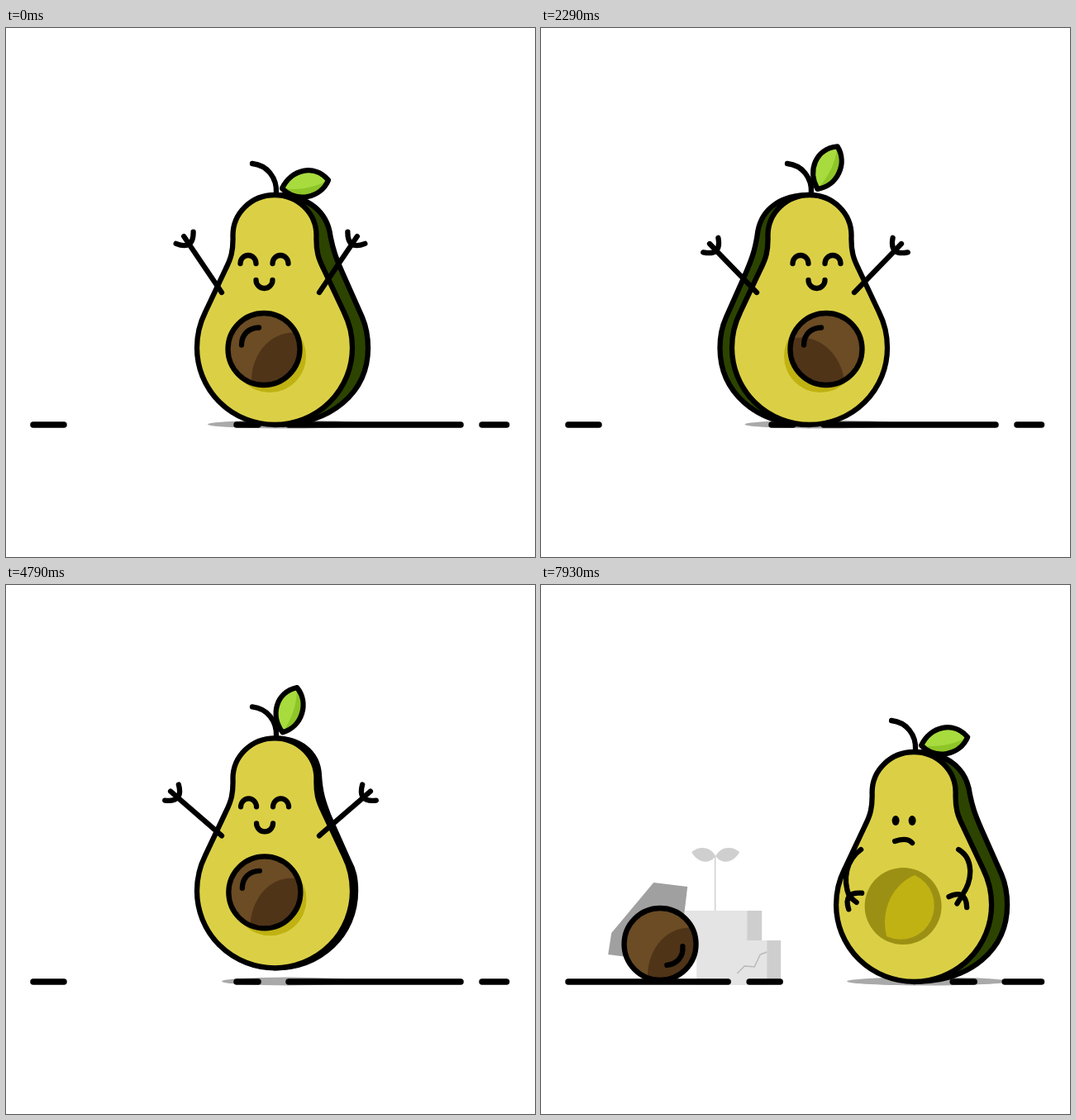
These frames come from a looping animation (640 by 640 pixels, 8 s). An HTML page:

```html
<!DOCTYPE html>
<html lang="en">
<head>
<meta charset="utf-8">
<title>Avocado</title>
<style>
html, body { margin: 0; width: 100%; height: 100%; overflow: hidden; background: #fff; }
svg { display: block; width: 100vw; height: 100vh; }
.ink { stroke: #000; stroke-width: 6.3; stroke-linecap: round; stroke-linejoin: round; }
.line { fill: none; }
</style>
</head>
<body>
<svg id="stage" viewBox="0 0 640 640">
  <g id="ruins">
    <path fill="#a0a0a0" d="M136 360L177 365L166 458L81 447L85 421Z"/>
    <path fill="#e4e4e4" d="M174 394H249V430H174ZM188 430H273V484H188Z"/>
    <path fill="#cecece" d="M249 394H267V430H249ZM273 430H290V477H273Z"/>
    <path fill="none" stroke="#b8b8b8" stroke-width="1.4" d="M237 470L246 461L258 462L265 447L273 444"/>
    <path fill="none" stroke="#cfcfcf" stroke-width="1.4" d="M210.500 394V328"/>
    <path fill="#cfcfcf" d="M211 328C204 315 190 316 182 323C189 336 203 339 211 328C219 339 233 336 240 323C232 316 218 315 211 328Z"/>
  </g>
  <ellipse id="shadow" cy="479.500" ry="5" fill="#a9a9a9"/>
  <path id="ground" class="ink line" style="stroke-width:7.5"/>
  <g id="body">
    <path id="stem" class="ink line" d="M298 164C316 166 328 181 327 200"/>
    <path id="back" class="ink" fill="#2c4400"/>
    <g id="leaf">
      <path fill="#a8dc3e" d="M334 194C345 171 373 164 390 184C381 206 351 212 334 194Z"/>
      <path fill="#8ec528" d="M334 194C354 197 374 193 390 184C381 206 351 212 334 194Z"/>
      <path class="ink line" d="M334 194C345 171 373 164 390 184C381 206 351 212 334 194Z"/>
    </g>
    <path class="ink" fill="#dbd045" d="M325 202C297 202 274 224 274.500 252C275 270 272 279 266 291L241 344C234 358 231 372 231 387A94 93 0 0 0 419 387C419 372 416 358 409 344L384 291C378 279 375 270 375.500 252C376 224 353 202 325 202Z"/>
    <g id="hole">
      <circle cx="312" cy="388.500" r="46.500" fill="#9c9014"/>
      <path fill="#c0b212" d="M326 351C300 362 284 392 292 425A40.500 40.500 0 1 0 326 351Z"/>
    </g>
    <circle id="cast" cy="397" r="44" fill="#c0b212"/>
    <g id="happy" class="ink line">
      <path d="M283.500 285a9.500 10 0 0 1 19 0M322.500 285a9.500 10 0 0 1 19 0M302.500 305a10 10 0 0 0 20 0"/>
    </g>
    <g id="sad">
      <ellipse cx="303" cy="285" rx="4.500" ry="6"/>
      <ellipse cx="323" cy="285" rx="4.500" ry="6"/>
      <path class="ink line" d="M302 310Q317 305 323 312"/>
    </g>
    <g id="slot"></g>
    <path id="armL" class="ink line"/>
    <path id="armR" class="ink line" transform="matrix(-1 0 0 1 640 0)"/>
  </g>
  <g id="seed">
    <circle r="43.500" fill="#6b4c24"/>
    <path id="shade" fill="#4f3418" d="M-15 41C-16 8 6 -21 38 -20A43.500 43.500 0 0 1 -15 41Z"/>
    <path id="shine" class="ink line" d="M-27 -5C-27 -18 -18 -26 -6 -26"/>
    <circle r="43.500" class="ink line"/>
  </g>
</svg>
<script>
const LOOP = 8000, CYCLE = 2590, POP = 5520;
const el = {};
document.querySelectorAll('[id]').forEach(e => el[e.id] = e);

const set = (e, attrs) => { for (const k in attrs) e.setAttribute(k, attrs[k]); };
const show = (e, on) => e.style.display = on ? '' : 'none';
const mix = (a, b, u) => a + (b - a) * u;
const smooth = (t, a, b) => {
  const u = Math.min(1, Math.max(0, (t - a) / (b - a)));
  return u * u * (3 - 2 * u);
};
// Eased keyframes given as time, value, time, value...
function keys(t, ...k) {
  let v = k[1];
  for (let i = 2; i < k.length; i += 2)
    if (t > k[i - 2]) v = mix(k[i - 1], k[i + 1], smooth(t, k[i - 2], k[i]));
  return v;
}

function backPath(turn) {
  const s = turn < 0 ? -1 : 1, m = Math.abs(turn);
  const x = (base, d) => (325 + s * (base + d * m)).toFixed(2);
  return `M325 202C${x(28, 8)} 202 ${x(50, 10)} 218 ${x(50.5, 16)} 246` +
    `C${x(51, 19)} 268 ${x(55, 20)} 280 ${x(61, 21)} 296L${x(85, 21)} 350` +
    `C${x(92, 19)} 362 ${x(94, 19)} 372 ${x(94, 19)} 387` +
    `C${x(94, 19)} 440 ${x(52, 18)} 480 325 480Z`;
}

// Poses hold two control points and the wrist, for an arm on the left.
const HANG = [[240, 320, 222, 335, 217, 360], [242, 319, 228, 334, 222, 361]];
const HOLD = [[244, 332, 238, 355, 247, 377], [244, 330, 242, 355, 257, 376]];
const HOLD_TURN = [231, 211];

function armPath(side, swing, drop, hold) {
  const h = mix(mix(34 + swing, 180, drop), HOLD_TURN[side], hold) * Math.PI / 180;
  const ux = -Math.sin(h), uy = -Math.cos(h);
  const bend = smooth(drop, 0.45, 1);
  const p = HANG[side].map((v, i) => {
    const reach = [24, 48, 71][i >> 1];
    const straight = i % 2 ? 320 + uy * reach : 261 + ux * reach;
    return mix(mix(straight, v, bend), HOLD[side][i], hold);
  });
  const at = (u, v) => `${(p[4] + ux * u - uy * v).toFixed(2)} ${(p[5] + uy * u + ux * v).toFixed(2)}`;
  return `M261 320C${p.map(v => v.toFixed(2)).join(' ')}L${at(11, 0)}` +
    `M${at(9, -12.8)}Q${at(-10, 0)} ${at(9, 12.5)}`;
}

function groundPath(pan) {
  return [[-400, 7], [33, 70], [279, 305], [342, 550], [576, 1200]].map(([a, b]) => {
    const l = Math.max(33, a + pan), r = Math.min(605.5, b + pan);
    return r > l ? `M${l.toFixed(2)} 480H${r.toFixed(2)}` : '';
  }).join('');
}

function seedY(t) {
  const hop = (a, b, h) => t > a && t < b ? 4 * h * (t - a) * (b - t) / (b - a) ** 2 : 0;
  const base = mix(395, 432.5, smooth(t, POP, 5830));
  return base - hop(POP, 5830, 45) - hop(5830, 6030, 21.5) - hop(6030, 6150, 5);
}

function draw(t) {
  const jumps = t < 2 * CYCLE;
  const first = t < CYCLE;
  const p = jumps ? t % CYCLE : 0;

  const pan = 225 * smooth(t, 7000, 8030);
  const shift = pan * 126 / 219;
  const lift = jumps ? Math.max(0, 46.2 * (1 - ((p - 1845) / 445) ** 2)) : 0;
  const squash = jumps
    ? keys(p, 0, 0, 600, .155, 860, .165, 1030, .21, 1390, 0, 2290, 0, 2420, .21, 2585, 0)
    : keys(t, 5200, 0, 5490, .168, 5740, 0);
  const swing = keys(p, 1380, 0, 1500, 9, 1900, 16, 2210, 15, 2420, 0);
  const leaf = keys(p, 1380, 0, 1500, 24, 1750, 20, 2110, -62, 2240, -62, 2480, 0);
  const shrink = keys(p, 1380, 0, 1500, 11, 1850, 30, 2200, 17, 2320, 0);

  // 0 has the skin on the right, 1 on the left
  const way = u => !jumps ? 0 : first ? u : 1 - u;
  const face = way(smooth(p, 1550, 2270));
  const skin = way(smooth(p, 1745, 2510));
  const seedX = mix(312, 345, face);
  const side = mix(1, -1, face);

  set(el.ruins, { transform: `translate(${(pan - 219) * 1.35} 0)` });
  set(el.ground, { d: groundPath(pan) });
  set(el.shadow, { cx: 341.5 + shift, rx: 97.5 - shrink });
  const pose = `translate(${325 + shift} ${480 - lift}) scale(${1 + squash} ${1 - squash * .44}) translate(-325 -480)`;
  set(el.body, { transform: pose });
  set(el.back, { d: backPath(mix(1, -1.2, skin)) });
  set(el.leaf, { transform: `rotate(${leaf} 335 194)` });

  const popped = t >= POP, gloomy = t >= 6400;
  show(el.hole, popped);
  show(el.cast, !popped);
  show(el.happy, !gloomy);
  show(el.sad, gloomy);
  set(el.cast, { cx: seedX + 7 * side });
  set(el.happy, { transform: `translate(${mix(0, 21, face)} 0)` });

  const drop = smooth(t, 6080, 6620), hold = smooth(t, 7150, 7700);
  set(el.armL, { d: armPath(0, swing, drop, hold) });
  set(el.armR, { d: armPath(1, swing, drop, hold) });

  const home = popped ? el.stage : el.slot;
  if (el.seed.parentNode !== home) home.appendChild(el.seed);
  let x = seedX, y = 388.5, spin = 0;
  if (popped) {
    const u = Math.min(1, (t - POP) / 410);
    x = mix(310, 142, 1 - (1 - u) ** 2) - 89 * smooth(t, 5900, 6920) + pan * 91 / 219;
    y = seedY(t) + pan / 219 * 2;
    spin = -132 * u - 213 * smooth(t, 5900, 6950) - pan / 219 * 200;
  }
  set(el.seed, { transform: `translate(${x} ${y})` });
  set(el.shade, { transform: `scale(${side} 1) rotate(${13 * skin})` });
  set(el.shine, { transform: `rotate(${spin})` });
}

const start = performance.now();
function tick() {
  draw((performance.now() - start) % LOOP);
  requestAnimationFrame(tick);
}
tick();
</script>
</body>
</html>
```
